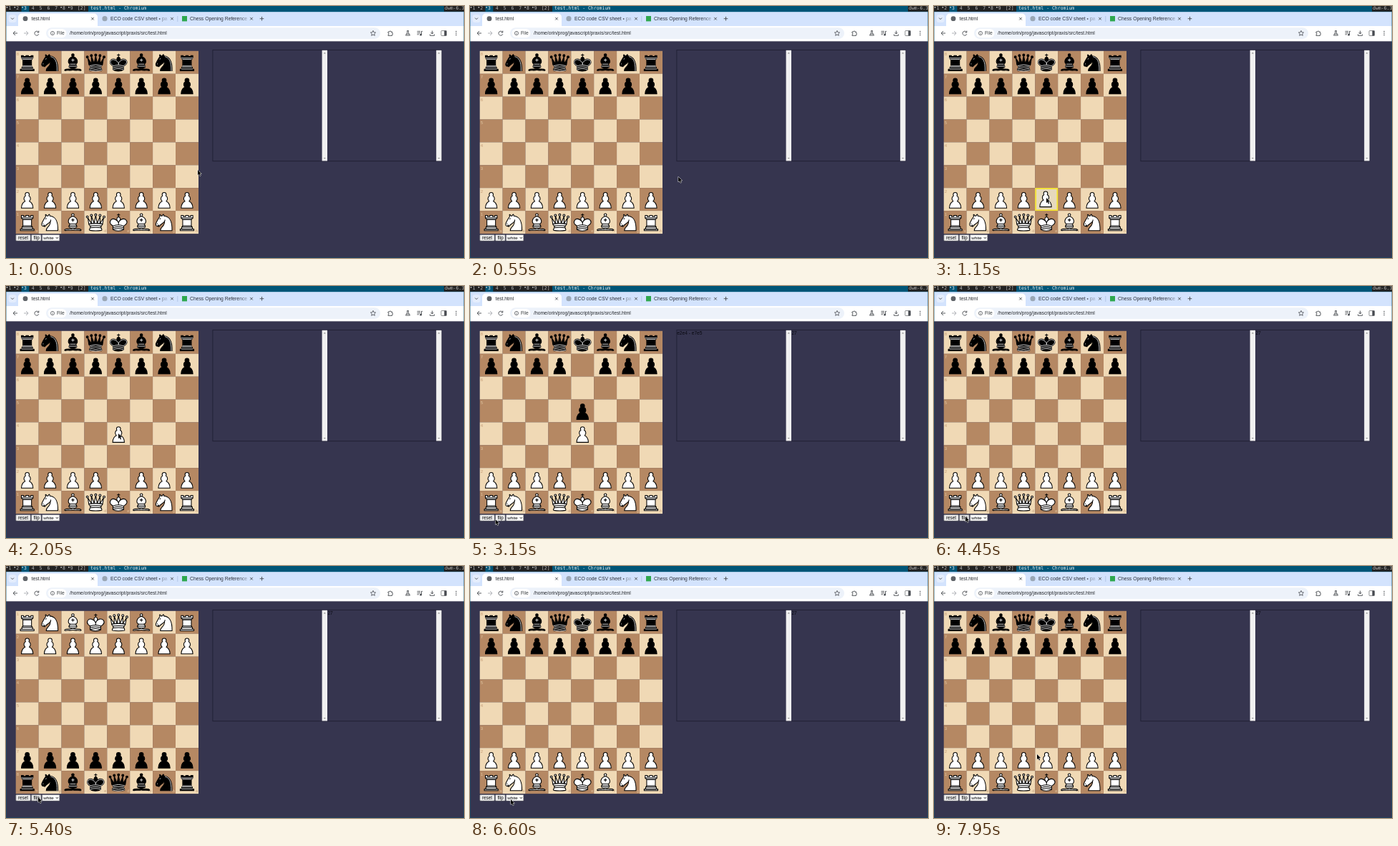
Animation, 640 px wide and 352 px high, one loop 8 s. Source, as an HTML page with a canvas:

```html
<!DOCTYPE html>
<html lang="en">
<head>
<meta charset="utf-8">
<title>Chess board demo</title>
<style>
html, body { margin: 0; width: 100%; height: 100%; overflow: hidden; background: #36354f; }
canvas { display: block; width: 640px; height: 352px; }
</style>
</head>
<body>
<canvas id="stage"></canvas>
<script>
const W = 640, H = 352, LOOP = 8000;
const canvas = document.getElementById('stage');
const ctx = canvas.getContext('2d');
const ratio = window.devicePixelRatio || 1;
canvas.width = W * ratio;
canvas.height = H * ratio;

const SANS = '"Liberation Sans", Arial, sans-serif';
const MONO = '"DejaVu Sans Mono", monospace';
const LIGHT = '#f0d9b5', DARK = '#b58863', PAGE = '#36354f';
const BOARD = { x: 13.7, y: 62.8, sq: 31.9 };

// Event times in ms
const PICK = 1120, DRAG = 1250, DROP = 1680, REPLY = 2080, RESET = 3750;
const FLIPS = [4600, 5600], FADE = 300;

// Cursor keys: time, x, y
const CURSOR = [
  [0, 268, 229], [350, 306, 235], [900, 257, 247], [1090, 157, 268],
  [DRAG, 157, 268], [1600, 157, 206], [2500, 157, 206], [3150, 35.5, 326],
  [3450, 27, 323], [4050, 27, 323], [4400, 44, 322], [4700, 44, 322],
  [5300, 45, 323], [6250, 45, 323], [6600, 57, 326], [7450, 57, 326],
  [7950, 144, 263], [LOOP, 148, 260]
];

// Outlines live on a 45 unit grid; `white` / `black` hold inner lines.
const PIECES = {
  p: { body: ['M22.5 9c-2.21 0-4 1.79-4 4 0 .89.29 1.71.78 2.38C17.33 16.5 16 18.59 16 21c0 2.03.94 3.84 2.41 5.03-3 1.06-7.41 5.55-7.41 13.47h23c0-7.92-4.41-12.41-7.41-13.47 1.47-1.19 2.41-3 2.41-5.03 0-2.41-1.33-4.5-3.28-5.62.49-.67.78-1.49.78-2.38 0-2.21-1.79-4-4-4z'] },
  r: {
    body: ['M9 39h27v-3H9z', 'M12 36v-4h21v4z', 'M14 29.5V17h17v12.5l1.5 2.5h-20z', 'M14 17l-3-3V9h4v2h5V9h5v2h5V9h4v5l-3 3z'],
    white: 'M11 14h23M14 29.5h17',
    black: 'M12 35.5h21M13 31.5h19M14 29.5h17M14 16.5h17M11 14h23'
  },
  n: {
    body: ['M22 10c10.5 1 16.5 8 16 29H15c0-9 10-6.5 8-21',
      'M24 18c.38 2.91-5.55 7.37-8 9-3 2-2.82 4.34-5 4-1.04-.94 1.41-3.04 0-3-1 0 .19 1.23-1 2-1 0-4 1-4-4 0-2 6-12 6-12s1.89-1.9 2-3.5c-.73-1-.5-2-.5-3 1-1 3 2.5 3 2.5h2s.78-2 2.5-3c1 0 1 3 1 3'],
    white: 'M9 25.3v.4M14.9 15l-.7 1.2',
    black: 'M9 25.3v.4M14.9 15l-.7 1.2M24.5 11.2c7 2 12.6 8 11.9 28'
  },
  b: {
    body: ['M9 36c3.39-.97 10.11.43 13.5-2 3.39 2.43 10.11 1.03 13.5 2 0 0 1.65.54 3 2-.68.97-1.65.99-3 .5-3.39-.97-10.11.46-13.5-1-3.39 1.46-10.11.03-13.5 1-1.35.49-2.32.47-3-.5 1.35-1.94 3-2 3-2z',
      'M15 32c2.5 2.5 12.5 2.5 15 0 .5-1.5 0-2 0-2 0-2.5-2.5-4-2.5-4 5.5-1.5 6-11.5-5-15.5-11 4-10.5 14-5 15.5 0 0-2.5 1.5-2.5 4 0 0-.5.5 0 2z',
      'M25 8a2.5 2.5 0 1 1-5 0 2.5 2.5 0 1 1 5 0z'],
    white: 'M17.5 26h10M15 30h15M22.5 15.5v5M20 18h5'
  },
  q: {
    body: ['M9 26c8.5-1.5 21-1.5 27 0l2-12-7 11V11l-5.5 13.5-3-15-3 15-5.5-14V25L7 14z',
      'M9 26c0 2 1.5 2 2.5 4 1 1.5 1 1 .5 3.5-1.5 1-1.5 2.5-1.5 2.5-1.5 1.5.5 2.5.5 2.5 6.5 1 16.5 1 23 0 0 0 1.5-1 0-2.5 0 0 .5-1.5-1-2.5-.5-2.5-.5-2 .5-3.5 1-2 2.5-2 2.5-4-8.5-1.5-18.5-1.5-27 0z',
      ...[[6, 12], [14, 9], [22.5, 8], [31, 9], [39, 12]].map(([x, y]) => `M${x + 2} ${y}a2 2 0 1 1-4 0 2 2 0 1 1 4 0z`)],
    white: 'M11.5 30c3.5-1 18.5-1 22 0M12 33.5c6-1 15-1 21 0',
    black: 'M11 29a35 35 0 0 1 23 0M12.5 31.5h20M11.5 34.5a35 35 0 0 0 22 0M10.5 37.5a35 35 0 0 0 24 0'
  },
  k: {
    body: ['M22.5 11.63V6M20 8h5',
      'M22.5 25s4.5-7.5 3-10.5c0 0-1-2.5-3-2.5s-3 2.5-3 2.5c-1.5 3 3 10.5 3 10.5',
      'M11.5 37c5.5 3.5 15.5 3.5 21 0v-7s9-4.5 6-10.5c-4-6.5-13.5-3.5-16 4V27v-3.5c-3.5-7.5-13-10.5-16-4-3 6 5 10 5 10z'],
    white: 'M11.5 30c5.5-3 15.5-3 21 0M11.5 33.5c5.5-3 15.5-3 21 0M11.5 37c5.5-3 15.5-3 21 0',
    black: 'M32 29.5s8.5-4 6-9.65C34.15 14 25 18 22.5 24.5v2.1-2.1C20 18 9.9 14 7 19.85c-2.5 5.65 4.85 9 4.85 9M11.5 30c5.5-3 15.5-3 21 0M11.5 33.5c5.5-3 15.5-3 21 0M11.5 37c5.5-3 15.5-3 21 0'
  }
};
for (const p of Object.values(PIECES)) {
  p.body = p.body.map(d => new Path2D(d));
  const white = new Path2D(p.white || '');
  p.black = p.black ? new Path2D(p.black) : white;
  p.white = white;
}

const clamp = v => Math.min(1, Math.max(0, v));
const ease = v => v * v * (3 - 2 * v);
const mix = (a, b, k) => a + (b - a) * k;
const progress = (t, start, span) => ease(clamp((t - start) / span));

function rect(x, y, w, h, fill) {
  ctx.fillStyle = fill;
  ctx.fillRect(x, y, w, h);
}
function round(x, y, w, h, r, fill, stroke) {
  ctx.beginPath();
  ctx.roundRect(x, y, w, h, r);
  ctx.fillStyle = fill;
  ctx.fill();
  if (stroke) { ctx.strokeStyle = stroke; ctx.lineWidth = 0.6; ctx.stroke(); }
}
function text(s, x, y, size, fill, family = SANS) {
  ctx.font = `${size}px ${family}`;
  ctx.fillStyle = fill;
  ctx.fillText(s, x, y);
}
function line(d, x, y, color = '#474a50', width = 0.9) {
  ctx.save();
  ctx.translate(x, y);
  ctx.strokeStyle = color;
  ctx.lineWidth = width;
  ctx.stroke(new Path2D(d));
  ctx.restore();
}
function dot(x, y, r, fill) {
  ctx.beginPath();
  ctx.arc(x, y, r, 0, 7);
  ctx.fillStyle = fill;
  ctx.fill();
}
function fadeText(s, x, y, from, to) {
  const g = ctx.createLinearGradient(from, 0, to, 0);
  g.addColorStop(0, '#2b3038');
  g.addColorStop(1, 'rgba(43,48,56,0)');
  text(s, x, y, 6.8, g);
}

function drawTopBar() {
  rect(0, 0, W, 8, '#222222');
  rect(21.5, 0, 10.8, 8, '#005577');
  rect(115, 0, 497, 8, '#005577');
  for (let i = 1; i <= 9; i++) {
    const x = (i - 1) * 10.8;
    text(i, x + 3.4, 5.4, 6.4, i === 3 ? '#eeeeee' : '#bbbbbb', MONO);
    if (i < 4 || i > 7) rect(x + 0.7, 1, 1.6, 1.6, '#cccccc');
  }
  text('[2]', 100, 5.4, 6.4, '#bbbbbb', MONO);
  text('test.html - Chromium', 118, 5.4, 6.5, '#eeeeee', MONO);
  text('dwm-6.3', 613, 5.4, 6.5, '#bbbbbb', MONO);
}

function drawTabs() {
  rect(0, 8, W, 21, '#d3e3fd');
  round(3.5, 12, 11, 11, 3.5, '#e4edfd');
  line('M-2-1L0 1 2-1', 9, 17.6);
  round(17, 10.5, 111, 22, 5, '#ffffff');
  dot(27, 17.7, 3.4, '#5f6368');
  text('test.html', 35.5, 20, 6.8, '#24272c');
  dot(138, 17.7, 3.6, '#9aa7b5');
  fadeText('ECO code CSV sheet • pa', 146, 20, 210, 229);
  rect(246, 14, 7, 7.4, '#2fa84f');
  fadeText('Chess Opening Reference', 257, 20, 325, 343);
  for (const x of [121, 232, 343]) line('M-1.8-1.8L1.8 1.8M1.8-1.8L-1.8 1.8', x, 17.7);
  rect(239.5, 14, 0.7, 8, '#a5bce0');
  line('M-2.8 0H2.8M0-2.8V2.8', 357.5, 17.7);
}

function drawToolbar() {
  rect(0, 28, W, 21.3, '#ffffff');
  line('M3 0H-3M0-3L-3 0 0 3', 13, 38);
  line('M-3 0H3M0-3L3 0 0 3', 28, 38, '#a8abb0');
  line('M2.6-1.3A3 3 0 1 0 2.8 1.2M2.8-3.4V-1H.4', 43, 38);
  round(56, 30.3, 467, 15.6, 7.8, '#edf2fa');
  round(58.5, 32, 26, 12.2, 6.1, '#ffffff');
  line('M2.6 0A2.6 2.6 0 1 1-2.6 0 2.6 2.6 0 1 1 2.6 0M0-.4V1.5M0-1.6V-1', 65, 38, '#474a50', 0.7);
  text('File', 71, 40.3, 6.7, '#3c4043');
  text('/home/orin/prog/javascript/praxis/src/test.html', 89, 40.3, 6.75, '#24272c');
  line('M0-3.6L1.1-1.2 3.6-1 1.7.8 2.3 3.3 0 2-2.3 3.3-1.7.8-3.6-1-1.1-1.2z', 513, 38, '#474a50', 0.8);
  line('M-3-2H-1A1 1 0 0 1 1-2H2.5V0A1 1 0 0 1 2.5 2V3.4H-3V2A1 1 0 0 0-3 0z', 537, 38);
  line('M-1.2-3.4H1.2M-.8-3.4V-.8L-3 3H3L.8-.8V-3.4M-1.7 1H1.7', 561.5, 38);
  line('M-3.5-2.6H1M-3.5-.4H1M-3.5 1.8H-1M4-2.6H2.5V2', 578, 38);
  dot(579.6, 40.2, 1.4, '#474a50');
  line('M0-3.4V1M-2-1L0 1 2-1M-3 1.5V3.3H3V1.5', 595.5, 38);
  round(608, 34.5, 7.5, 7, 1, '#ffffff', '#474a50');
  rect(612.4, 34.5, 3.1, 7, '#474a50');
  for (const y of [35.4, 38, 40.6]) dot(629, y, 0.75, '#474a50');
}

function drawScrollbar(x) {
  rect(x, 61.8, 7.4, 154.6, '#f1f1f1');
  ctx.fillStyle = '#8b8b8b';
  ctx.fill(new Path2D(`M${x + 2.2} 66.4h3l-1.5-1.7zM${x + 2.2} 211.9h3l-1.5 1.7z`));
}

function drawPanel(t) {
  ctx.strokeStyle = '#1d1c30';
  ctx.lineWidth = 0.8;
  ctx.strokeRect(288.9, 61.4, 319.8, 155.3);
  drawScrollbar(441.6);
  drawScrollbar(601.2);
  if (t >= REPLY && t < RESET) text('e2e4 - e7e5', 289.2, 68, 6.6, '#0a0a12');
  if (t >= REPLY) text('27', 449.4, 68, 6.6, '#0a0a12');
}

function drawButtons(c) {
  const button = (label, x, w) => {
    const hover = c.x > x && c.x < x + w && c.y > 319 && c.y < 328.5;
    round(x, 319.6, w, 8.5, 1, hover ? '#e2e2e2' : '#efefef', '#6b6b6b');
    text(label, x + 3.1, 326, 6.3, '#000000');
  };
  button('reset', 13.8, 20.4);
  button('flip', 35.5, 13.6);
  round(50.5, 319.6, 24.3, 8.5, 0.6, '#ffffff', '#6b6b6b');
  text('white', 52.3, 326, 6.2, '#000000');
  line('M-1.5-.8L0 .8 1.5-.8', 71.3, 323.9, '#000000', 0.9);
}

function cell(file, rank, flipped) {
  return {
    x: BOARD.x + (flipped ? 7 - file : file) * BOARD.sq,
    y: BOARD.y + (flipped ? rank : 7 - rank) * BOARD.sq
  };
}

function drawPiece(kind, isWhite, x, y) {
  const p = PIECES[kind];
  ctx.save();
  ctx.translate(x, y);
  ctx.scale(BOARD.sq / 45, BOARD.sq / 45);
  ctx.lineJoin = ctx.lineCap = 'round';
  ctx.lineWidth = 1.5;
  ctx.strokeStyle = '#000000';
  ctx.fillStyle = isWhite ? '#ffffff' : '#000000';
  for (const path of p.body) { ctx.fill(path); ctx.stroke(path); }
  ctx.strokeStyle = isWhite ? '#000000' : '#ececec';
  ctx.lineWidth = isWhite ? 1.5 : 1.2;
  ctx.stroke(isWhite ? p.white : p.black);
  ctx.restore();
}

function drawFrame(file, rank) {
  const { x, y } = cell(file, rank, false);
  rect(x, y, BOARD.sq, BOARD.sq, 'rgba(215,215,200,.4)');
  ctx.strokeStyle = '#f7e52f';
  ctx.lineWidth = 1.8;
  ctx.strokeRect(x + 0.9, y + 0.9, BOARD.sq - 1.8, BOARD.sq - 1.8);
}

function drawBoard(t, c) {
  const flipped = t >= FLIPS[0] + FADE && t < FLIPS[1] + FADE;
  const { x: bx, y: by, sq } = BOARD;
  for (let row = 0; row < 8; row++) {
    for (let col = 0; col < 8; col++) {
      const odd = (row + col) % 2;
      const x = bx + col * sq, y = by + row * sq;
      rect(x, y, sq + 0.1, sq + 0.1, odd ? DARK : LIGHT);
      ctx.globalAlpha = 0.75;
      const ink = odd ? LIGHT : DARK;
      if (col === 0) text(flipped ? row + 1 : 8 - row, x + 1.1, y + 6.6, 6, ink);
      if (row === 7) text('abcdefgh'[flipped ? 7 - col : col], x + sq - 4, y + sq - 1.6, 5.4, ink);
      ctx.globalAlpha = 1;
    }
  }

  const dragging = t >= PICK && t < DROP;
  if (dragging) {
    drawFrame(4, 1);
    const over = Math.floor((by + 8 * sq - c.y) / sq);
    if (over !== 1) drawFrame(4, over);
  }

  let alpha = 1;
  for (const f of FLIPS) if (t >= f) alpha = clamp(Math.abs(t - f - FADE) / FADE);
  ctx.globalAlpha = alpha;
  const back = progress(t, RESET, FADE);
  const whiteRank = t < DROP ? 1 : mix(3, 1, back);
  const blackRank = mix(mix(6, 4, progress(t, REPLY, FADE)), 6, back);
  const order = 'rnbqkbnr';
  for (let file = 0; file < 8; file++) {
    for (const isWhite of [false, true]) {
      const home = cell(file, isWhite ? 0 : 7, flipped);
      drawPiece(order[file], isWhite, home.x, home.y);
      const advanced = isWhite ? whiteRank : blackRank;
      if (file === 4 && isWhite && dragging) continue;
      const pawn = cell(file, file === 4 ? advanced : isWhite ? 1 : 6, flipped);
      drawPiece('p', isWhite, pawn.x, pawn.y);
    }
  }
  if (dragging) drawPiece('p', true, c.x - 1 - sq / 2, c.y + 0.6 - sq / 2);
  ctx.globalAlpha = 1;
}

function cursorAt(t) {
  const i = Math.max(1, CURSOR.findIndex(k => k[0] > t));
  const [t0, x0, y0] = CURSOR[i - 1], [t1, x1, y1] = CURSOR[i];
  const k = ease((t - t0) / (t1 - t0));
  return { x: mix(x0, x1, k), y: mix(y0, y1, k) };
}

const ARROW = new Path2D('M0 0V7.2L1.7 5.7 2.9 8.4 4.1 7.9 2.9 5.2H5.2z');
function drawCursor(c) {
  ctx.save();
  ctx.translate(c.x, c.y);
  ctx.strokeStyle = '#ffffff';
  ctx.lineWidth = 1;
  ctx.stroke(ARROW);
  ctx.fillStyle = '#000000';
  ctx.fill(ARROW);
  ctx.restore();
}

function draw(now) {
  const t = now % LOOP;
  const c = cursorAt(t);
  ctx.setTransform(ratio, 0, 0, ratio, 0, 0);
  rect(0, 0, W, H, PAGE);
  drawTopBar();
  drawTabs();
  drawToolbar();
  drawPanel(t);
  drawBoard(t, c);
  drawButtons(c);
  ctx.strokeStyle = '#005577';
  ctx.lineWidth = 0.4;
  ctx.strokeRect(0.2, 8, W - 0.4, H - 8.2);
  drawCursor(c);
  requestAnimationFrame(tick);
}

const start = performance.now();
function tick() { draw(performance.now() - start); }
tick();
</script>
</body>
</html>
```
